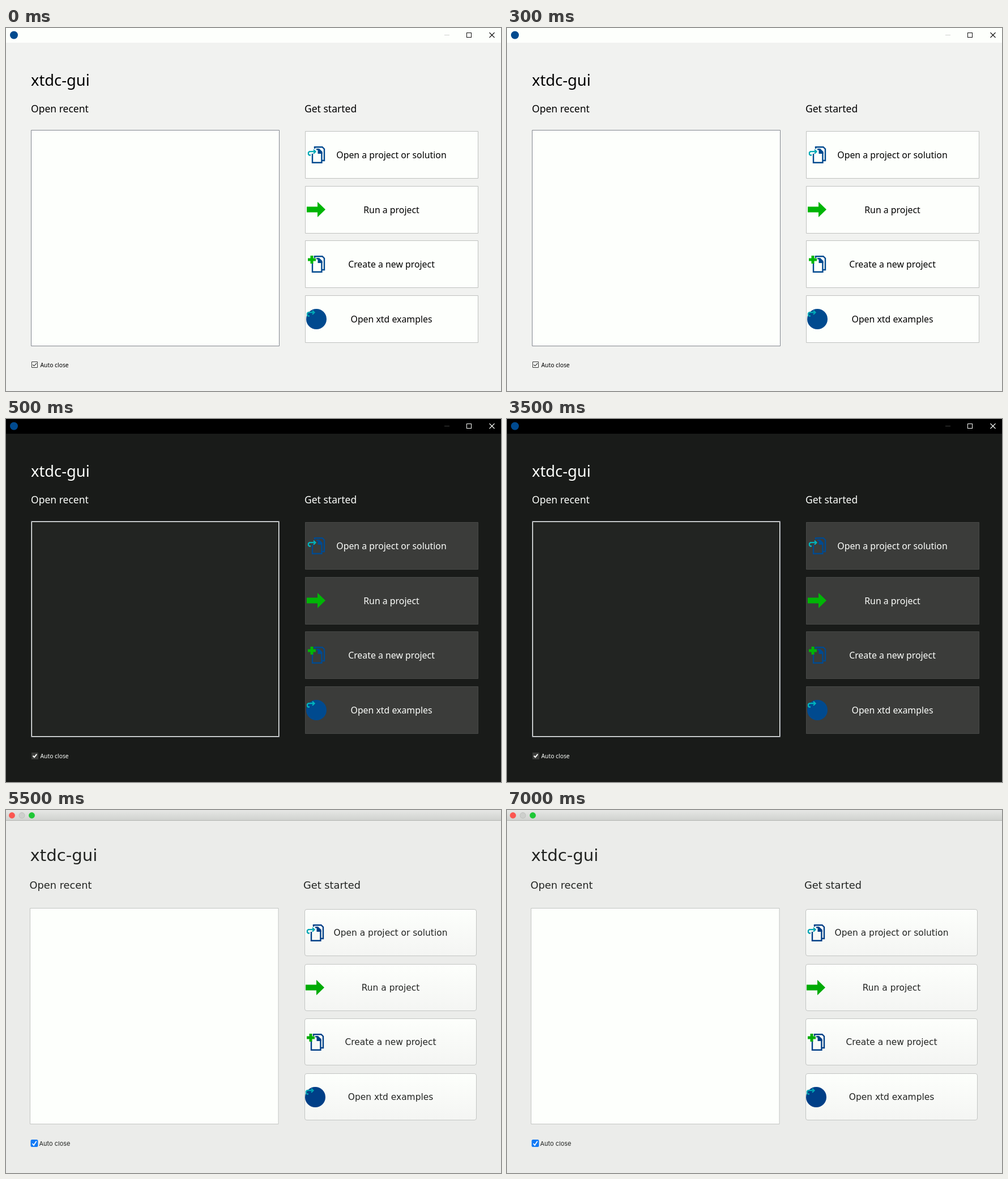
Recreate the animation shown at these times as an HTML page with a canvas. Size 874x641 px, loop 8 s.

```html
<!DOCTYPE html>
<html lang="en">
<head>
<meta charset="utf-8">
<title>xtdc-gui</title>
<style>
  html, body { margin: 0; width: 100%; height: 100%; overflow: hidden; }
  canvas { display: block; }
</style>
</head>
<body>
<canvas id="stage" width="874" height="641"></canvas>
<script>
const ctx = document.getElementById('stage').getContext('2d');
const LOOP = 8000;
const LABELS = ['Open a project or solution', 'Run a project', 'Create a new project', 'Open xtd examples'];
const NOTO = '"Noto Sans", sans-serif';
const DEJAVU = '"DejaVu Sans", sans-serif';
const INTER = 'Inter, sans-serif';

const winLayout = {
  font: NOTO, center: 680.5, labelSize: 15.85, headSize: 17.5,
  title: [44, 102, 27.3], recent: [44, 148.5], start: [527, 148.5],
  check: [60.5, 599, 10.3, NOTO],
  list: [44, 180, 439, 382],
  button: [528, 182, 306, 84.5], radius: 0, shift: [0, 0]
};
const light = {
  ...winLayout, bar: '#fdfffc', bg: '#f1f2f0', text: '#000', ink: '#111',
  listFill: '#fdfffc', listEdge: '#83878f',
  face: ['#fdfffc', '#fdfffc'], edge: '#bfc1bf',
  blue: '#004a8f', cyan: '#00a9b5', green: '#00b506', faint: '#cfd1cf'
};
const dark = {
  ...winLayout, dark: true, bar: '#000', bg: '#191b19', text: '#fdfffc', ink: '#fdfffc',
  listFill: '#222422', listEdge: '#83878f',
  face: ['#3b3c3a', '#3b3c3a'], edge: '#464846',
  blue: '#004a8f', cyan: '#00b5bd', green: '#00b506', faint: '#3c3e3c'
};
const mac = {
  mac: true, font: DEJAVU, center: 679, labelSize: 15.45, headSize: 17.8,
  title: [42.5, 90, 29.2], recent: [41.5, 138.5], start: [525, 138.5],
  check: [58.5, 592.5, 11, INTER],
  list: [42, 173, 439.5, 382],
  button: [527, 175, 304, 83], radius: 3.5, shift: [-2, -7],
  bg: '#ebecea', text: '#222422', listFill: '#fdfffc', listEdge: '#c3c5c3',
  face: ['#fdfffc', '#f4f5f3'], edge: '#c3c5c3',
  blue: '#003f87', cyan: '#00a5b3', green: '#00ab06'
};

function rect(x, y, w, h, color) {
  ctx.fillStyle = color;
  ctx.fillRect(x, y, w, h);
}

function disc(x, y, r, color) {
  ctx.fillStyle = color;
  ctx.beginPath();
  ctx.arc(x, y, r, 0, Math.PI * 2);
  ctx.fill();
}

// Points are a flat list: x, y, x, y...
function trace(points) {
  ctx.beginPath();
  for (let i = 0; i < points.length; i += 2) ctx.lineTo(points[i], points[i + 1]);
}

function line(points, color, width) {
  trace(points);
  ctx.strokeStyle = color;
  ctx.lineWidth = width;
  ctx.stroke();
}

function poly(points, color) {
  trace(points);
  ctx.fillStyle = color;
  ctx.fill();
}

function frameBox(x, y, w, h, fill, edge, radius = 0) {
  ctx.beginPath();
  ctx.roundRect(x + 0.5, y + 0.5, w - 1, h - 1, radius);
  ctx.fillStyle = fill;
  ctx.fill();
  ctx.strokeStyle = edge;
  ctx.lineWidth = 1;
  ctx.stroke();
}

function text(str, x, y, size, font, color, align = 'left') {
  ctx.font = `${size}px ${font}`;
  ctx.textAlign = align;
  ctx.fillStyle = color;
  ctx.fillText(str, x, y);
}

function pages(t) {
  line([545, 213, 545, 210.2, 558.5, 210.2, 562, 213.7, 562, 234, 558, 234], t.blue, 2.4);
  line([541, 222, 541, 237.8, 557.4, 237.8, 557.4, 220], t.blue, 2.4);
  poly([548, 213, 553, 213, 558.6, 218.6, 558.6, 222, 550.5, 222, 550.5, 215.4, 548, 215.4], t.blue);
}

function backArrow(t, x, y) {
  line([x + 5, y + 9.5, x + 2.5, y + 9.5, x + 1, y + 8, x + 1, y + 4.8, x + 2.8, y + 3.2, x + 13, y + 3.2], t.cyan, 2.3);
  line([x + 10, y - 0.3, x + 13.5, y + 3.2, x + 10, y + 6.7], t.cyan, 2.2);
}

const icons = [
  t => { pages(t); backArrow(t, 533, 215); },
  t => poly([531, 218.5, 550, 218.5, 550, 210, 564, 223.5, 550, 237, 550, 228.5, 531, 228.5], t.green),
  t => {
    pages(t);
    rect(533, 213.5, 14, 5, t.green);
    rect(537.5, 209, 5, 14, t.green);
  },
  t => { disc(548, 224, 18, t.blue); backArrow(t, 531, 209); }
];

function titleBar(t) {
  if (t.mac) {
    const g = ctx.createLinearGradient(0, 0, 0, 19);
    g.addColorStop(0, '#e6e7e5');
    g.addColorStop(1, '#cfd1ce');
    rect(0, 0, 874, 18.5, g);
    rect(0, 18, 874, 1, '#b3b5b2');
    disc(10.5, 9.5, 5.4, '#fb5650');
    disc(28, 9.5, 5.4, '#bcbebb');
    disc(28, 9.5, 4.6, '#cdcfcc');
    disc(45.5, 9.5, 5.4, '#1fc736');
    return;
  }
  rect(0, 0, 874, 26, t.bar);
  disc(14, 12.5, 7, t.blue);
  rect(774, 12, 9, 1, t.faint);
  ctx.strokeStyle = t.ink;
  ctx.lineWidth = 1;
  ctx.strokeRect(813.5, 8.5, 8, 8);
  line([853.5, 8, 862.5, 17], t.ink, 1.1);
  line([862.5, 8, 853.5, 17], t.ink, 1.1);
}

function checkBox(t) {
  if (t.mac) {
    ctx.beginPath();
    ctx.roundRect(43.5, 582, 13, 13, 2.5);
    ctx.fillStyle = '#137af5';
    ctx.fill();
    line([46.5, 589, 49, 592, 53.7, 584.8], '#fff', 1.7);
  } else if (t.dark) {
    rect(45, 589, 12, 12, '#3b3c3a');
    line([47.5, 594.8, 50, 597.3, 54.3, 591.8], '#fdfffc', 2);
  } else {
    frameBox(45, 589, 11, 11, '#fdfffc', '#333');
    line([47.3, 594.5, 49.5, 596.8, 54, 592], '#222', 1.1);
  }
}

function draw(t) {
  rect(0, 0, 874, 641, t.bg);
  titleBar(t);

  const [tx, ty, size] = t.title;
  text('xtdc-gui', tx, ty, size, t.font, t.text);
  text('Open recent', ...t.recent, t.headSize, t.font, t.text);
  text('Get started', ...t.start, t.headSize, t.font, t.text);

  const [lx, ly, lw, lh] = t.list;
  frameBox(lx, ly, lw, lh, t.listFill, t.listEdge);
  if (t.dark) frameBox(lx + 1, ly + 1, lw - 2, lh - 2, t.listFill, '#fdfffc');

  const [bx, by, bw, bh] = t.button;
  LABELS.forEach((label, i) => {
    const dy = Math.round(i * 96.6);
    const g = ctx.createLinearGradient(0, by + dy, 0, by + dy + bh);
    g.addColorStop(0, t.face[0]);
    g.addColorStop(1, t.face[1]);
    frameBox(bx, by + dy, bw, Math.floor(bh), g, t.edge, t.radius);
    text(label, t.center, (t.mac ? 222 : 230) + dy, t.labelSize, t.font, t.text, 'center');
    ctx.save();
    ctx.translate(t.shift[0], t.shift[1] + dy);
    icons[i](t);
    ctx.restore();
  });

  checkBox(t);
  text('Auto close', ...t.check, t.text);
}

const start = performance.now();
function tick() {
  const ms = (performance.now() - start) % LOOP;
  draw(ms < 500 ? light : ms < 5500 ? dark : mac);
  requestAnimationFrame(tick);
}
tick();
</script>
</body>
</html>
```
